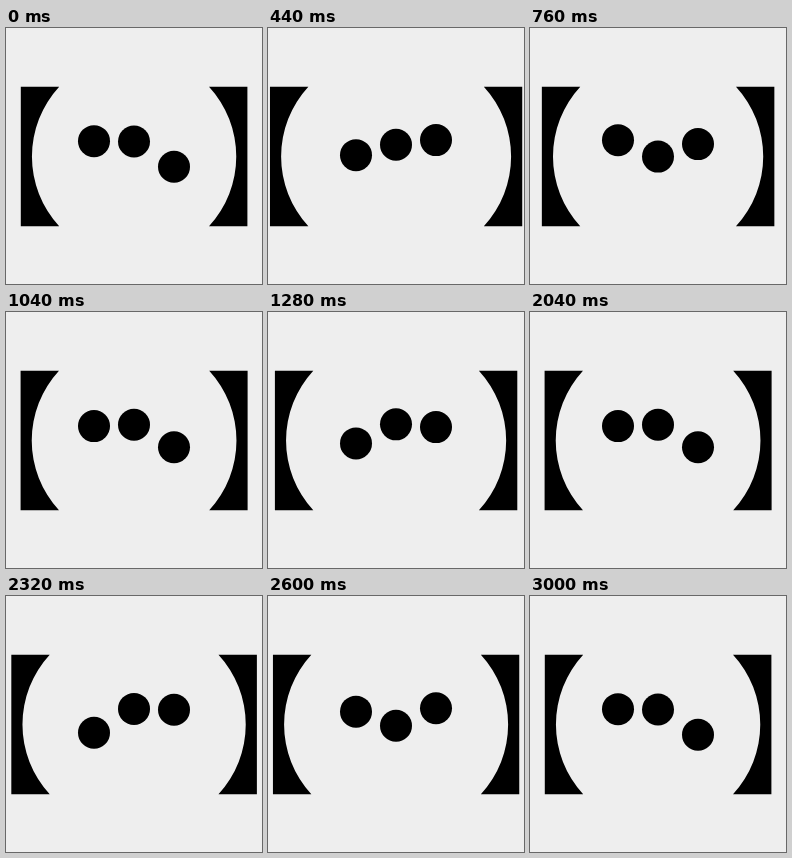
An HTML page for the animation above (3.04 s loop, 256 by 256 pixels).

```html
<!DOCTYPE html>
<html lang="en">
<head>
<meta charset="utf-8">
<title>Bouncing dots</title>
<style>
  html, body { margin: 0; width: 100%; height: 100%; overflow: hidden; background: #eee; }
  svg { display: block; width: 100vw; height: 100vh; }
</style>
</head>
<body>
<svg viewBox="0 0 256 256">
  <defs>
    <path id="bracket" d="M0 58.7H38.4A103 103 0 0 0 38.4 198.3H0Z"/>
  </defs>
  <use id="left" href="#bracket"/>
  <use id="right" href="#bracket"/>
  <circle class="dot" cx="88" r="16"/>
  <circle class="dot" cx="128" r="16"/>
  <circle class="dot" cx="168" r="16"/>
</svg>
<script>
  const LOOP = 3040, STEP = 40, CYCLE = 1000;
  const left = document.getElementById('left');
  const right = document.getElementById('right');
  const dots = document.querySelectorAll('.dot');

  const wrap = u => u - Math.floor(u);

  // Height of a dot: sharp impact at the bottom, long float at the top
  function dotY(u) {
    const near = Math.abs(2 * wrap(u - 0.008) - 1);
    return 112 + 28 * near ** 2.8;
  }

  // Outer edge of the left bracket: eased outwards, then a quicker return
  function edgeX(u) {
    const w = wrap(2 * u);
    const spread = u < 0.5
      ? (1 - Math.cos(Math.PI * w)) / 2
      : (1 - w ** 1.5) ** 3.2;
    return 14.8 - 13.3 * spread;
  }

  function draw(now) {
    const t = Math.floor((now % LOOP) / STEP) * STEP;
    const u = (t % CYCLE) / CYCLE;
    const x = edgeX(u);
    left.setAttribute('transform', `translate(${x} 0)`);
    right.setAttribute('transform', `translate(${256.2 - x} 0) scale(-1 1)`);
    dots.forEach((dot, i) => dot.setAttribute('cy', dotY(u + (2 - i) / 3)));
  }

  const start = performance.now();
  function tick() {
    draw(performance.now() - start);
    requestAnimationFrame(tick);
  }
  tick();
</script>
</body>
</html>
```
